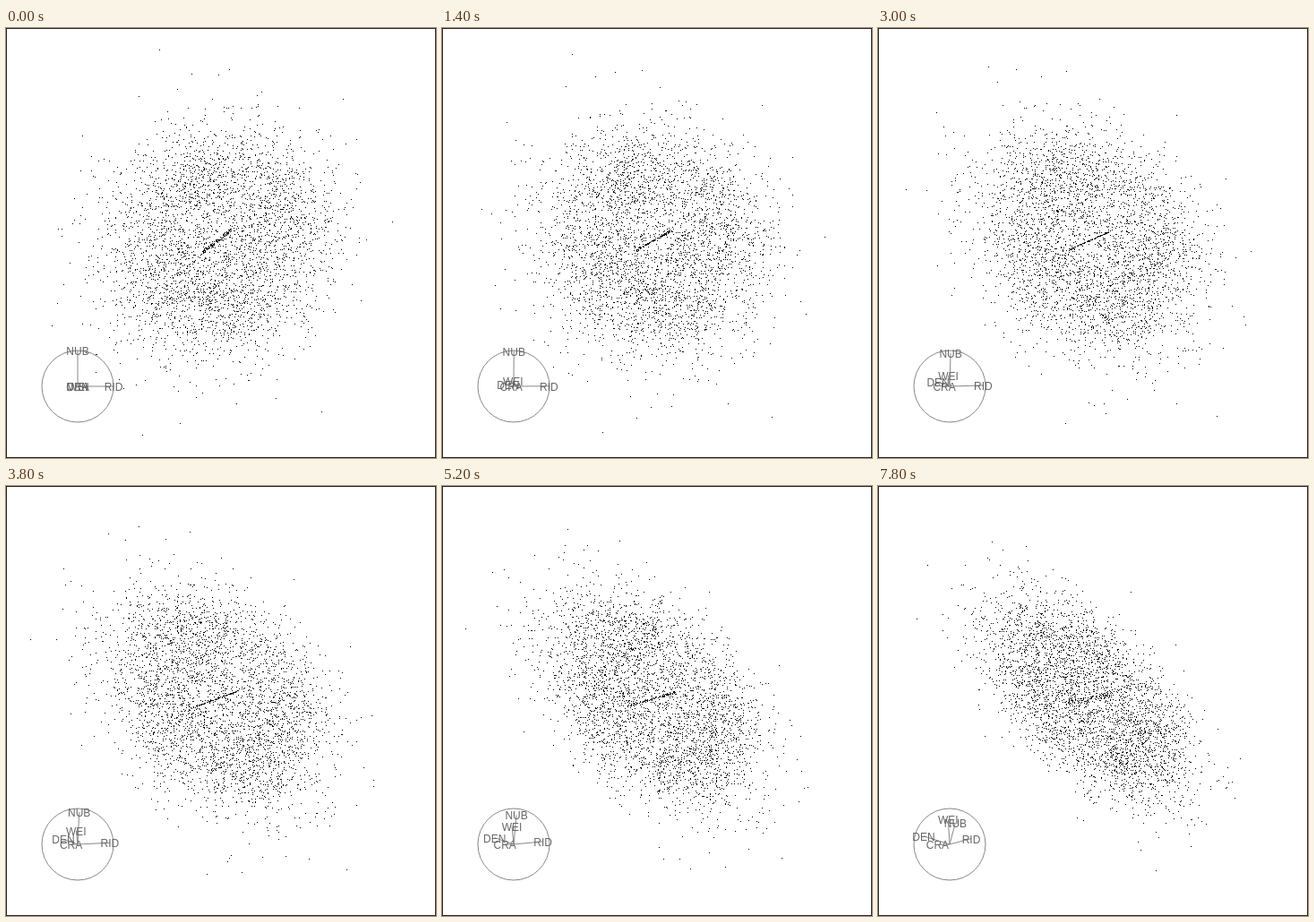
Recreate the animation shown at these times as an HTML page with a canvas. Size 480 by 480 pixels, loop 8000 ms.

```html
<!DOCTYPE html>
<html lang="en">
<head>
<meta charset="utf-8">
<title>Grand tour</title>
<style>
html, body { margin: 0; width: 100%; height: 100%; overflow: hidden; background: #fff; }
canvas { display: block; width: 480px; height: 480px; }
</style>
</head>
<body>
<canvas id="stage" width="480" height="480"></canvas>
<script>
const ctx = document.getElementById('stage').getContext('2d');

const STEP = 200, STEPS = 40;
const CENTER = [235.5, 237];
const DIAL = { x: 80, y: 400, r: 40 };
const COUNT = 3750, LINE_COUNT = 99;

// Principal angles turned per step
const TURN = [0.707 / 39, 1.115 / 39];

// Each 4D point: [start1, start2, end1, end2] along the two principal diagonals
const H = Math.SQRT1_2;
const AXES = [
  ['RID', [H, H, 0, 0]],
  ['NUB', [H, -H, 0, 0]],
  ['CRA', [0, 0, -0.38, -0.26]],
  ['WEI', [0, 0, 0.71, -0.58]],
  ['DEN', [0, 0, -0.54, -0.75]]
];

const LOBES = [
  [32, -60, -6, -14],
  [66, 42, -51, 47],
  [-55, -1, 7, -36],
  [-42, 49, 38, 31]
];

let seed = 20117;
function rand() {
  seed = (seed + 0x6D2B79F5) | 0;
  let t = Math.imul(seed ^ (seed >>> 15), 1 | seed);
  t = (t + Math.imul(t ^ (t >>> 7), 61 | t)) ^ t;
  return ((t ^ (t >>> 14)) >>> 0) / 4294967296;
}

function normal() {
  return Math.sqrt(-2 * Math.log(1 - rand())) * Math.cos(2 * Math.PI * rand());
}

// Correlated cloud, thinned out near its middle
function cloudPoint() {
  const z = [normal(), normal(), normal(), normal()];
  const len = Math.hypot(...z);
  const k = Math.sqrt(1.5 + 0.62 * len * len) / len;
  const [p, q, r, s] = z.map(v => v * k);
  return [68 * p, 62 * q, -43.4 * p + 46 * r, 23.9 * q + 63.5 * s];
}

function lobePoint() {
  const lobe = LOBES[Math.floor(rand() * LOBES.length)];
  return lobe.map(v => v + 24 * normal());
}

// Thin sheet of points hidden in the middle
function linePoint() {
  const u = 2 * rand() - 1, v = 2 * rand() - 1;
  return [20.2 * u - 1.4 * v, 2.5 * u + 1.4 * v, 10.7 * u + 4.9 * v, 15.7 * u - 3 * v];
}

const points = [];
for (let i = 0; i < COUNT; i++) points.push(rand() < 0.13 ? lobePoint() : cloudPoint());
for (let i = 0; i < LINE_COUNT; i++) points.push(linePoint());

function projector(step) {
  const [a, b] = TURN.map(v => v * step);
  const c1 = Math.cos(a), s1 = Math.sin(a), c2 = Math.cos(b), s2 = Math.sin(b);
  return p => {
    const u = c1 * p[0] + s1 * p[2];
    const v = c2 * p[1] + s2 * p[3];
    return [(u + v) * H, (v - u) * H];
  };
}

function drawDial(project) {
  ctx.strokeStyle = '#888';
  ctx.lineWidth = 1;
  ctx.beginPath();
  ctx.arc(DIAL.x, DIAL.y, DIAL.r, 0, 2 * Math.PI);
  ctx.stroke();
  ctx.fillStyle = '#666';
  ctx.font = '12px "Liberation Sans", Arial, sans-serif';
  ctx.textAlign = 'center';
  ctx.textBaseline = 'alphabetic';
  for (const [name, axis] of AXES) {
    const [dx, dy] = project(axis);
    const x = DIAL.x + DIAL.r * dx, y = DIAL.y + DIAL.r * dy;
    ctx.beginPath();
    ctx.moveTo(DIAL.x, DIAL.y);
    ctx.lineTo(x, y);
    ctx.stroke();
    ctx.fillText(name, x, y + 5);
  }
}

function draw(step) {
  const project = projector(step);
  ctx.fillStyle = '#fff';
  ctx.fillRect(0, 0, 480, 480);
  ctx.strokeStyle = '#222';
  ctx.lineWidth = 1;
  ctx.strokeRect(0.5, 0.5, 479, 479);
  drawDial(project);
  ctx.fillStyle = '#000';
  for (const p of points) {
    const [dx, dy] = project(p);
    ctx.fillRect(Math.round(CENTER[0] + dx), Math.round(CENTER[1] + dy), 1, 1);
  }
}

const start = performance.now();
function tick() {
  const t = Math.max(0, performance.now() - start);
  draw(Math.floor(t / STEP) % STEPS);
  requestAnimationFrame(tick);
}
tick();
</script>
</body>
</html>
```
